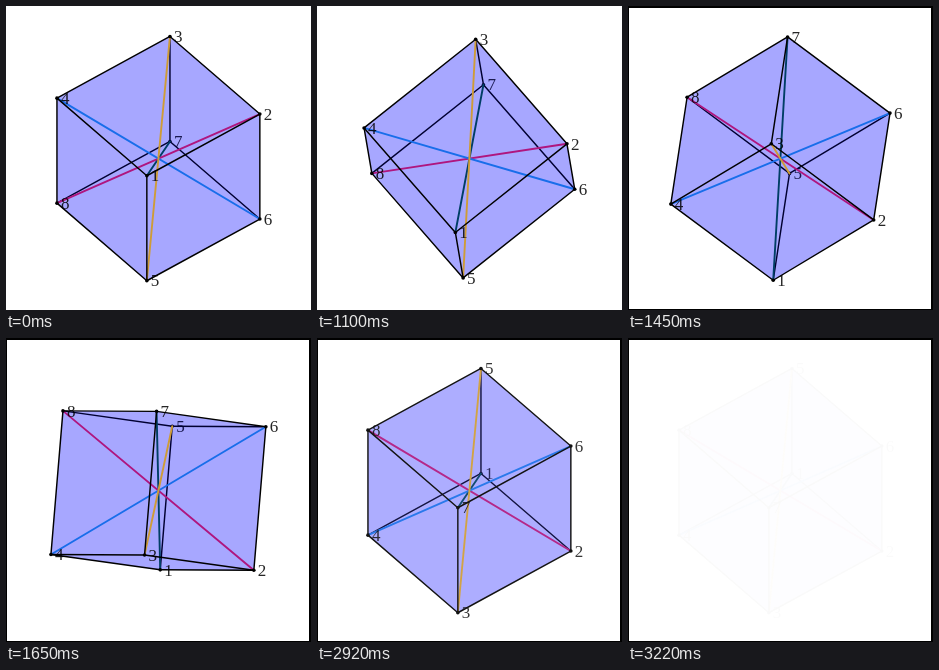
These frames come from a looping animation (305x304 px, 3.3 s). An HTML page:

```html
<!DOCTYPE html>
<html lang="en">
<head>
<meta charset="utf-8">
<title>Rotating cube</title>
<style>
  html, body { margin: 0; width: 100%; height: 100%; overflow: hidden; background: #fff; }
  svg { position: absolute; left: 0; top: 0; width: 305px; height: 304px; }
  #border { position: absolute; left: 0; top: 0; width: 305px; height: 304px; box-sizing: border-box;
    border: solid #000; border-width: 2px 2px 1px 1px; }
  .face { fill: #00f; fill-opacity: .194; }
  line { stroke-linecap: round; }
  .edge { stroke: #000; stroke-width: 1.45; }
  .diagonal { stroke-width: 1.9; }
  text { font: 17px "Liberation Serif", "Noto Serif", serif; fill-opacity: .85; }
</style>
</head>
<body>
<svg viewBox="0 0 305 304"><g id="cube"></g></svg>
<div id="border"></div>
<script>
const LOOP = 3300, TURN = 1000, TURN_STEP = 50, TURNS = 19;
const FADE = 2920, FADE_STEP = 20, FADE_STEPS = 15;
const BORDER_ON = 1150;
const SIDE = 144.4, CX = 152.4, CY = 152.6;
const SPIN = 38.5 * Math.PI / 180, TILT = 46.64 * Math.PI / 180;

const cube = document.getElementById('cube');
const border = document.getElementById('border');

function make(tag, attrs, text) {
  const el = document.createElementNS('http://www.w3.org/2000/svg', tag);
  set(el, attrs);
  if (text) el.textContent = text;
  return el;
}
function set(el, attrs) {
  for (const k in attrs) el.setAttribute(k, attrs[k]);
}

// Screen space: x right, y down, z away from the viewer.
function view(x, y, z) {
  const h = SIDE / 2, c = Math.cos(SPIN), s = Math.sin(SPIN);
  const side = x * c - y * s, deep = x * s + y * c;
  return [
    h * side,
    h * (z * Math.sin(TILT) - deep * Math.cos(TILT)),
    h * (z * Math.cos(TILT) + deep * Math.sin(TILT))
  ];
}
const dot = (a, b) => a[0] * b[0] + a[1] * b[1] + a[2] * b[2];
const cross = (a, b) => [
  a[1] * b[2] - a[2] * b[1],
  a[2] * b[0] - a[0] * b[2],
  a[0] * b[1] - a[1] * b[0]
];
function rotate(v, u, angle) {
  const c = Math.cos(angle), s = Math.sin(angle), w = cross(u, v), d = dot(u, v) * (1 - c);
  return v.map((n, i) => n * c + w[i] * s + u[i] * d);
}

const corners = [];
for (const z of [-1, 1])
  for (const [x, y] of [[-1, -1], [1, -1], [1, 1], [-1, 1]]) corners.push(view(x, y, z));

// The axis runs through the middles of edges 4-8 and 2-6.
const across = corners[3].map((n, i) => n - corners[1][i]);
const axis = across.map(n => n / Math.hypot(...across));

const digits = s => [...s].map(c => c - 1);
const faces = ['1234', '5678', '1265', '2376', '3487', '4158'].map(s => ({
  ids: digits(s), el: make('polygon', { class: 'face' })
}));
const edges = ['12', '23', '34', '41', '56', '67', '78', '85', '15', '26', '37', '48'].map(s => ({
  ids: digits(s), el: make('line', { class: 'edge' })
}));
const diagonals = [['17', '#004d40'], ['28', '#d81b60'], ['46', '#1e88e5'], ['35', '#ffc107']].map(([s, stroke]) => ({
  ids: digits(s), el: make('line', { class: 'diagonal', stroke })
}));
const marks = corners.map((_, i) => ({
  id: i, dot: make('circle', { r: 1.8 }), label: make('text', {}, String(i + 1))
}));

function pose(angle) {
  const p = corners.map(v => {
    const [x, y, z] = rotate(v, axis, -angle);
    return { x: CX + x, y: CY + y, z };
  });
  const far = p.reduce((best, q, i) => q.z > p[best].z ? i : best, 0);
  const isFront = f => f.ids.reduce((sum, i) => sum + p[i].z, 0) < 0;

  const drawFace = f => {
    set(f.el, { points: f.ids.map(i => p[i].x.toFixed(2) + ',' + p[i].y.toFixed(2)).join(' ') });
    cube.append(f.el);
  };
  const drawLine = l => {
    const [a, b] = l.ids.map(i => p[i]);
    set(l.el, { x1: a.x, y1: a.y, x2: b.x, y2: b.y });
    cube.append(l.el);
  };
  const drawMark = m => {
    const { x, y } = p[m.id];
    set(m.dot, { cx: x, cy: y });
    set(m.label, { x: x + 4, y: y + 5.7 });
    cube.append(m.dot, m.label);
  };

  faces.filter(f => !isFront(f)).forEach(drawFace);
  edges.filter(e => e.ids.includes(far)).forEach(drawLine);
  drawMark(marks[far]);
  diagonals.forEach(drawLine);
  faces.filter(isFront).forEach(drawFace);
  edges.filter(e => !e.ids.includes(far)).forEach(drawLine);
  marks.filter(m => m.id !== far).forEach(drawMark);
}

let shown = -1;
function render(t) {
  const step = t < TURN ? 0 : Math.min(TURNS, Math.floor((t - TURN) / TURN_STEP) + 1);
  if (step !== shown) {
    pose(Math.PI * step / TURNS);
    shown = step;
  }
  const k = Math.min(FADE_STEPS, Math.floor((t - FADE) / FADE_STEP));
  cube.setAttribute('opacity', t < FADE ? 1 : 0.92 - 0.9 * k / FADE_STEPS);
  border.style.visibility = t < BORDER_ON ? 'hidden' : 'visible';
}

const start = performance.now();
function tick() {
  render((performance.now() - start) % LOOP);
  requestAnimationFrame(tick);
}
tick();
</script>
</body>
</html>
```
